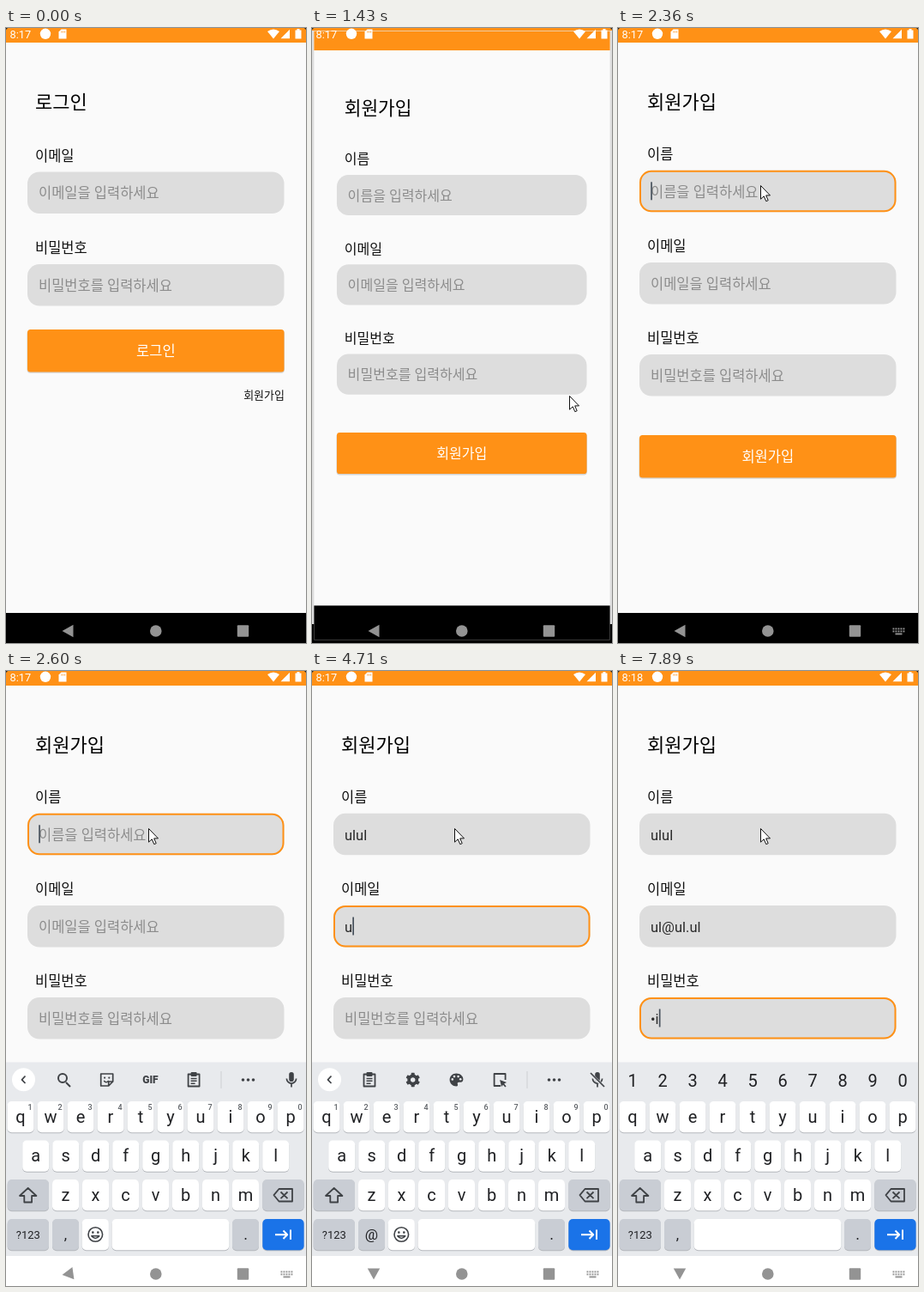
Write an HTML page that moves like this. It is 350x716 px and loops after 8000 ms.

```html
<!DOCTYPE html>
<html lang="ko">
<head>
<meta charset="utf-8">
<title>Sign up</title>
<style>
html, body { margin: 0; width: 100%; height: 100%; overflow: hidden; background: #fafafa; }
svg { display: block; width: 100vw; height: 100vh; }
text { font-family: Roboto, "Noto Sans CJK KR", "Noto Sans KR", "Noto Sans CJK", sans-serif; white-space: pre; }
</style>
</head>
<body>
<svg id="stage" viewBox="0 0 350 716" xmlns="http://www.w3.org/2000/svg"></svg>
<script>
const LOOP = 8000, ORANGE = '#ff9116', INK = '#3f4246', KEYINK = '#202124';
const stage = document.getElementById('stage');

// Value of the last [time, value] pair that has begun.
const at = (t, list) => list.reduce((v, [ms, x]) => (t >= ms ? x : v), list[0][1]);

const rect = (x, y, w, h, fill, rx = 0, extra = '') =>
  `<rect x="${x}" y="${y}" width="${w}" height="${h}" rx="${rx}" fill="${fill}" ${extra}/>`;
const circle = (x, y, r, fill, extra = '') => `<circle cx="${x}" cy="${y}" r="${r}" fill="${fill}" ${extra}/>`;
const fillPath = (d, fill) => `<path d="${d}" fill="${fill}"/>`;
const line = (d, color, w) =>
  `<path d="${d}" fill="none" stroke="${color}" stroke-width="${w}" stroke-linejoin="round"/>`;
const text = (s, x, y, size, fill, anchor = 'start', weight = 400) =>
  `<text x="${x}" y="${y}" font-size="${size}" fill="${fill}" text-anchor="${anchor}" font-weight="${weight}">${s}</text>`;
const group = (body, transform) => `<g transform="${transform}">${body}</g>`;

const ADVANCE = { u: .551, h: .551, l: .243, i: .243, '@': .898, '.': .263, '•': .34 };
const textWidth = s => [...s].reduce((w, c) => w + ADVANCE[c] * 16.5, 0);

// ---- pages ----
function field(y, label, hint, value = '', focused = false, caret = false, underline = false) {
  let s = text(label, 34, y - 13, 16.5, '#111') + rect(25, y, 299.5, 48.5, '#ddd', 14);
  if (focused) s += rect(26, y + 1, 297.5, 46.5, 'none', 13, `stroke="${ORANGE}" stroke-width="2"`);
  s += value ? text(value, 38, y + 30.7, 16.5, '#2a2a2a') : text(hint, 38, y + 30.7, 16.5, '#8c8c8c');
  const w = textWidth(value);
  if (underline) s += rect(38, y + 32.5, w, 1, '#2a2a2a');
  if (caret) s += rect(38.2 + w, y + 13.5, 1.7, 21, '#47515c');
  return s;
}

const button = (y, label) =>
  rect(24.5, y + 1.2, 300.5, 49.6, '#000', 4, 'opacity=".16"') +
  rect(25, y, 299.5, 49.5, ORANGE, 3.5) +
  text(label, 174.8, y + 31, 16.5, '#fff', 'middle', 500);

const backdrop = rect(-2.3, -6, 354.6, 728, '#fafafa') + rect(-2.3, -6, 354.6, 23, ORANGE) +
  rect(-2.3, 681, 354.6, 41, '#000');

const loginPage = backdrop + text('로그인', 34, 94, 22, '#000', 'start', 500) +
  field(167.5, '이메일', '이메일을 입력하세요') +
  field(275, '비밀번호', '비밀번호를 입력하세요') +
  button(351, '로그인') + text('회원가입', 325, 432, 13, '#111', 'end');

function signupPage(t) {
  const focus = at(t, [[0, -1], [2210, 0], [4240, 1], [6970, 2]]);
  const caretOn = !(t >= 2710 && t < 3230);
  const name = at(t, [[0, ''], [3710, 'u'], [3790, 'ul'], [4010, 'ulu'], [4070, 'ulul']]);
  const email = at(t, [[0, ''], [4710, 'u'], [4860, 'ul'], [5030, 'ul@'], [5410, 'ul@u'], [5490, 'ul@ul'],
    [5720, 'ul@ul.'], [6270, 'ul@ul'], [6420, 'ul@ul.'], [6740, 'ul@ul.u'], [6820, 'ul@ul.ul']]);
  const secret = at(t, [[0, ''], [7430, 'h'], [7510, '•i']]);
  const row = (i, y, label, hint, value, underline) =>
    field(y, label, hint, value, focus === i, focus === i && caretOn, underline);
  return backdrop + text('회원가입', 34, 94, 22, '#000', 'start', 500) +
    row(0, 165.8, '이름', '이름을 입력하세요', name, t >= 3790 && t < 4240) +
    row(1, 273, '이메일', '이메일을 입력하세요', email, t >= 4790 && t < 5260) +
    row(2, 380, '비밀번호', '비밀번호를 입력하세요', secret, false) +
    button(474, '회원가입');
}

// ---- system bars ----
function statusBar(t) {
  return text(t < 7890 ? '8:17' : '8:18', 4.5, 11.7, 12.8, '#fff') +
    circle(46, 6.8, 6.2, '#fff') +
    fillPath('M64.5 1.5H70.5V12.5H61.5V4.5Z', '#fff') +
    line('M64.8 3.5V5.5M66.7 3.5V5.5M68.6 3.5V5.5', ORANGE, .8) +
    fillPath('M305 4Q312 -1 319 4L312 12.5Z', '#fff') +
    fillPath('M320.5 12.3L331 1.8V12.3Z', '#fff') +
    fillPath('M337.5 2.5H339.5V1H342.5V2.5H344.5V12.5H337.5Z', '#fff') +
    fillPath('M0 0H2L0 2ZM350 0H348L350 2Z', '#222');
}

function navIcons(t) {
  const turn = at(t, [[0, 0], [2600, -8], [2680, -58], [2760, -90]]);
  let s = group(fillPath('M-6.5 0L6.5 -7.2V7.2Z', '#939393'), `translate(72 702) rotate(${turn})`) +
    circle(174.8, 702, 6.8, '#939393') + rect(269.8, 695.3, 13.4, 13.4, '#939393', 1);
  if (t >= 2360) {
    for (let i = 0; i < 5; i++)
      for (let j = 0; j < 2; j++) s += rect(320.5 + i * 3, 698.5 + j * 3, 1.9, 1.9, '#939393');
    s += rect(323.5, 704.5, 8, 1.9, '#939393');
  }
  return s;
}

// ---- keyboard ----
const key = (x, y, w, fill = '#fff') =>
  rect(x, y + 1, w, 36.2, '#b4b7bc', 5) + rect(x, y, w, 36.2, fill, 5);

const letters = (row, x0, y, baseline) => [...row].map((c, i) =>
  key(x0 + i * 35 - 15.5, y, 31) + text(c, x0 + i * 35, baseline, 20, KEYINK, 'middle')).join('');

const icons = {
  search: line('M3 3L8 8M4 -2A5 5 0 1 1 -6 -2A5 5 0 1 1 4 -2', INK, 2),
  sticker: line('M-7 -7H7V2L2 7H-7ZM7 2H2V7', INK, 1.7) +
    line('M-3.5 1Q-1 4.5 2 1', INK, 1.4) + circle(-2.6, -2.4, 1.1, INK) + circle(2.6, -2.4, 1.1, INK),
  gif: text('GIF', 0, 4.2, 12, INK, 'middle', 900),
  clipboard: line('M-6.5 -6.5H6.5V7.5H-6.5Z', INK, 1.8) + rect(-3.5, -9, 7, 5, INK, 1) +
    line('M-3.5 -1.5H3.5M-3.5 1.3H3.5M-3.5 4.2H1.5', INK, 1.4),
  gear: circle(0, 0, 4.6, 'none', `stroke="${INK}" stroke-width="3.6"`) +
    [0, 60, 120].map(a => group(rect(-2, -8.2, 4, 3, INK, .6) + rect(-2, 5.2, 4, 3, INK, .6), `rotate(${a})`)).join(''),
  palette: fillPath('M0 -7.5C-4.5 -7.5 -7.8 -4 -7.8 0S-4.3 7.5 0 7.5C2 7.5 1.8 5.8 1.4 4.8C1 3.6 1.8 2.8 3 2.8H5C7 2.8 8 1 8 -.8C8 -4.6 4.4 -7.5 0 -7.5Z', INK) +
    [[-4.6, -.6], [-2.4, -3.9], [2.2, -3.9], [4.8, -.8]].map(([x, y]) => circle(x, y, 1.3, '#e8eaed')).join(''),
  resize: line('M1 7H-6.5V-7H6.5V0', INK, 1.8) + fillPath('M0 0L8 3L5 4.6L7.5 7.5L6.2 8.6L3.8 5.8L2 8Z', INK),
  mic: rect(-2.8, -9, 5.6, 11, INK, 2.8) + line('M-5.6 -1.5A5.6 5.6 0 0 0 5.6 -1.5M0 4.5V8.5', INK, 1.7)
};
icons.micOff = icons.mic + line('M-8 -7L8 8.5', '#e8eaed', 3.4) + line('M-8 -8L8 8', INK, 1.7);

function toolbar(t) {
  const emailMode = t >= 4320;
  const words = at(t, [[0, null], [3790, ['ul', 'um', 'us']], [4010, ['ulu', 'up', 'us']],
    [4070, ['ulul', 'up', 'use']], [4320, null], [4790, ['', 'u', '']], [4860, ['', 'ul', '']],
    [5030, ['', 'ul@', '']], [5260, null]]);
  let s = circle(20.5, 475.8, 13.5, '#fff') +
    line(words ? 'M19 471.5L23 475.8L19 480' : 'M22.5 471.5L18.5 475.8L22.5 480', INK, 1.7);
  const put = (name, x) => group(icons[name], `translate(${x} 476)`);
  if (words) {
    s += words.map((w, i) => text(w, 87 + i * 82, 481.5, 16.5, KEYINK, 'middle')).join('');
    if (!emailMode) s += rect(128, 467, 1, 18, '#c8cbd0') + rect(210, 467, 1, 18, '#c8cbd0');
  } else {
    const tools = emailMode ? ['clipboard', 'gear', 'palette', 'resize'] : ['search', 'sticker', 'gif', 'clipboard'];
    s += tools.map((n, i) => put(n, 67 + i * 50.7)).join('') + rect(250.5, 466, 1, 20, '#cdd0d4');
    for (const x of [276.5, 282.5, 288.5]) s += circle(x, 476, 1.8, INK);
  }
  return s + put(emailMode ? 'micOff' : 'mic', 333);
}

function keyboard(t) {
  const pin = t >= 7050, grey = '#c9cdd4';
  let s = rect(0, 455.5, 350, 226, '#e8eaed');
  if (pin) s += [...'1234567890'].map((c, i) => text(c, 17 + i * 35, 483.5, 20, KEYINK, 'middle')).join('');
  else s += toolbar(t);
  s += letters('qwertyuiop', 17, 501, 525.5) + letters('asdfghjkl', 34.7, 546.5, 571) +
    letters('zxcvbnm', 69.5, 592, 616.5);
  if (!pin) s += [...'1234567890'].map((c, i) => text(c, 28 + i * 35, 511, 9, '#5b5f64', 'middle', 500)).join('');

  s += key(1.7, 592, 48.3, grey) +
    line('M25.7 602L16 611H21.3V618.5H30.1V611H35.4Z', INK, 1.8) +
    key(299.3, 592, 48.3, grey) +
    line('M318.5 603H334V617.5H318.5L312.5 610.2ZM320.5 606.5L328.5 614.2M328.5 606.5L320.5 614.2', INK, 1.8);

  s += key(1.7, 638, 48.3, grey) + text('?123', 25.8, 661, 13, KEYINK, 'middle') +
    key(54, 638, 31, grey) + text(t >= 4320 && !pin ? '@' : ',', 69.5, 662, 17, KEYINK, 'middle') +
    key(264, 638, 31, grey) + text('.', 279.5, 662, 18, KEYINK, 'middle');
  if (pin) s += key(88.7, 638, 171.5);
  else s += key(88.7, 638, 31.2) + key(123.6, 638, 136.6) +
    circle(104.3, 656, 8.3, 'none', `stroke="${INK}" stroke-width="1.6"`) +
    circle(101.3, 653.6, 1.3, INK) + circle(107.3, 653.6, 1.3, INK) +
    line('M99.8 657.8Q104.3 663.2 108.8 657.8Z', INK, 1.6);
  return s + key(299.3, 638, 48.3, '#1a73e8') +
    line('M314 656.2H328M323.5 651.5L328.2 656.2L323.5 661M332 650.5V662', '#fff', 2);
}

// ---- pointer ----
function pointer(t) {
  if (t < 120) return '';
  let [x, y] = at(t, [[120, [337, 677]], [200, [284, 580]], [280, [221, 495]], [430, [220, 505]], [510, [238, 500]],
    [590, [267, 473]], [660, [294, 442]], [740, [305, 430]], [820, [300, 428]]]);
  if (t >= 1510) {
    const p = Math.min(1, (Math.floor((t - 1510) / 77.5) + 1) / 9);
    const e = p * p * (3 - 2 * p);
    x -= 134 * e;
    y -= 245 * e;
  }
  const pressed = (t >= 1050 && t < 1200) || (t >= 2130 && t < 2210);
  return (pressed ? circle(x, y, 12, '#ff0', 'opacity=".47"') : '') +
    group('<path d="M.5 .5V16.2L4.2 12.8L6.8 18.7L9.2 17.7L6.7 11.9H11.5Z" fill="#fff" stroke="#111"/>',
      `translate(${x} ${y})`);
}

function scene(t) {
  let s;
  if (t < 1350) s = loginPage;
  else {
    const k = at(t, [[1350, .9], [1430, .9735], [1510, .99], [1590, .997], [1670, 1]]);
    s = k < 1 ? rect(0, 0, 350, 716, '#000') + rect(0, 0, 350, 3, ORANGE) + rect(0, 3, 350, 691, '#ddd') : '';
    s += group(signupPage(t), `translate(175 358) scale(${k}) translate(-175 -358)`);
  }
  s += statusBar(t);
  if (t >= 2530) {
    s += group(keyboard(t), `translate(0 ${t < 2600 ? 90 : 0})`) + rect(0, 681, 350, 35, '#fff');
  }
  return s + navIcons(t) + pointer(t);
}

let shown = '';
function draw(now) {
  const next = scene(now % LOOP);
  if (next !== shown) stage.innerHTML = shown = next;
}
const start = performance.now();
function tick() {
  draw(performance.now() - start);
  requestAnimationFrame(tick);
}
tick();
</script>
</body>
</html>
```
